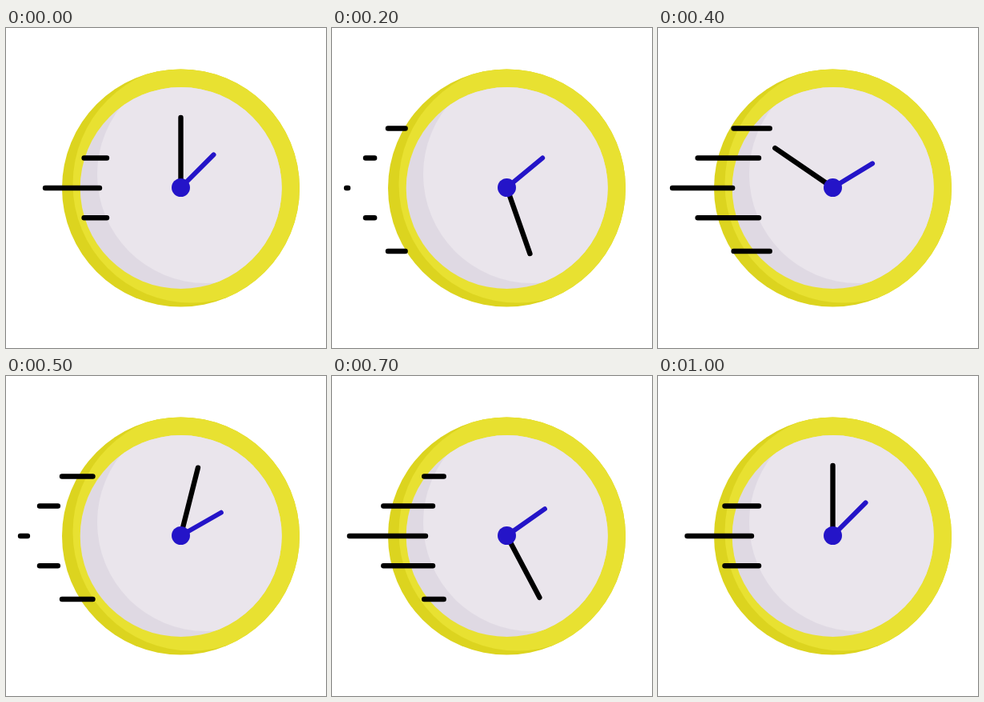
Animation of 400x400 px, one loop 1.02 s. Source, as an HTML page:

```html
<!DOCTYPE html>
<html lang="en">
<head>
<meta charset="utf-8">
<title>Fast clock</title>
<style>
  html, body { margin: 0; width: 100%; height: 100%; overflow: hidden; background: #fff; }
  svg { display: block; width: 100%; height: 100%; }
  line { stroke: #000; stroke-width: 6.4; stroke-linecap: round; }
  #hour { stroke: #2414c8; stroke-width: 6; }
</style>
</head>
<body>
<svg viewBox="0 0 400 400">
  <defs>
    <clipPath id="rim"><circle cx="218.5" cy="200" r="148.5"/></clipPath>
    <clipPath id="face"><circle cx="218.7" cy="200" r="126"/></clipPath>
  </defs>
  <circle cx="218.5" cy="200" r="148.5" fill="#dcd41f"/>
  <circle cx="232" cy="195" r="148.5" fill="#e8e131" clip-path="url(#rim)"/>
  <circle cx="218.7" cy="200" r="126" fill="#dfd9e3"/>
  <circle cx="250" cy="183" r="136" fill="#eae5ec" clip-path="url(#face)"/>
  <line id="minute" x1="218.5" y1="199.5" x2="218.5" y2="112"/>
  <line id="hour" x1="218.5" y1="199.5" x2="218.5" y2="141.5"/>
  <circle cx="218.5" cy="199.5" r="11.5" fill="#2414c8"/>
  <g id="streaks"></g>
</svg>
<script>
  const LOOP = 1020, STEPS = 40;
  const minute = document.getElementById('minute');
  const hour = document.getElementById('hour');
  const group = document.getElementById('streaks');

  // Horizontal streaks; start and period are counted in steps.
  const streaks = [
    { ys: [125.5, 279], left: 70, right: 139.7, start: 0.1, period: 13.3 },
    { ys: [162.5, 237.3], left: 42, right: 126, start: -1.25, period: 13.1 },
    { ys: [200], left: 18, right: 117, start: -2.8, period: 13.1 }
  ];
  for (const s of streaks) {
    s.lines = s.ys.map(y => {
      const line = document.createElementNS('http://www.w3.org/2000/svg', 'line');
      line.setAttribute('y1', y);
      line.setAttribute('y2', y);
      return group.appendChild(line);
    });
  }

  const clamp = v => Math.min(1, Math.max(0, v));
  const easeOut = (v, power) => 1 - Math.pow(1 - clamp(v), power);
  const smooth = v => v * v * (3 - 2 * v);

  function bezier(x, x1, y1, x2, y2) {
    const at = (s, a, b) => 3 * (1 - s) * (1 - s) * s * a + 3 * (1 - s) * s * s * b + s * s * s;
    let lo = 0, hi = 1;
    for (let i = 0; i < 24; i++) {
      const mid = (lo + hi) / 2;
      if (at(mid, x1, x2) < x) lo = mid; else hi = mid;
    }
    return at(hi, y1, y2);
  }

  function turn(hand, angle) {
    hand.setAttribute('transform', `rotate(${angle} 218.5 199.5)`);
  }

  function drawStreak(s, step) {
    const age = step - s.start;
    const local = age - Math.floor(age / s.period + 1e-9) * s.period;
    const shown = age > 0 && local > 0.05 && local < 12.2;
    const head = easeOut(local / 5.2, 1.5);
    const tail = easeOut((local - 4.8) / 7, 2);
    const span = s.right - s.left;
    for (const line of s.lines) {
      line.setAttribute('visibility', shown ? 'visible' : 'hidden');
      line.setAttribute('x1', s.right - span * head);
      line.setAttribute('x2', s.right - span * tail + 0.01);
    }
  }

  function draw(now) {
    const t = now % LOOP;
    // Steps last 20 and 30 ms in turn.
    const step = Math.floor(t / 50) * 2 + (t % 50 >= 20 ? 1 : 0);
    const p = step / STEPS;
    turn(minute, 720 * bezier(p, 0.167, 0.218, 0.667, 0.674));
    turn(hour, 45 + 15.3 * smooth(1 - Math.abs(1 - 2 * p)));
    for (const s of streaks) drawStreak(s, step);
  }

  const begin = performance.now();
  function tick() {
    draw(performance.now() - begin);
    requestAnimationFrame(tick);
  }
  tick();
</script>
</body>
</html>
```
